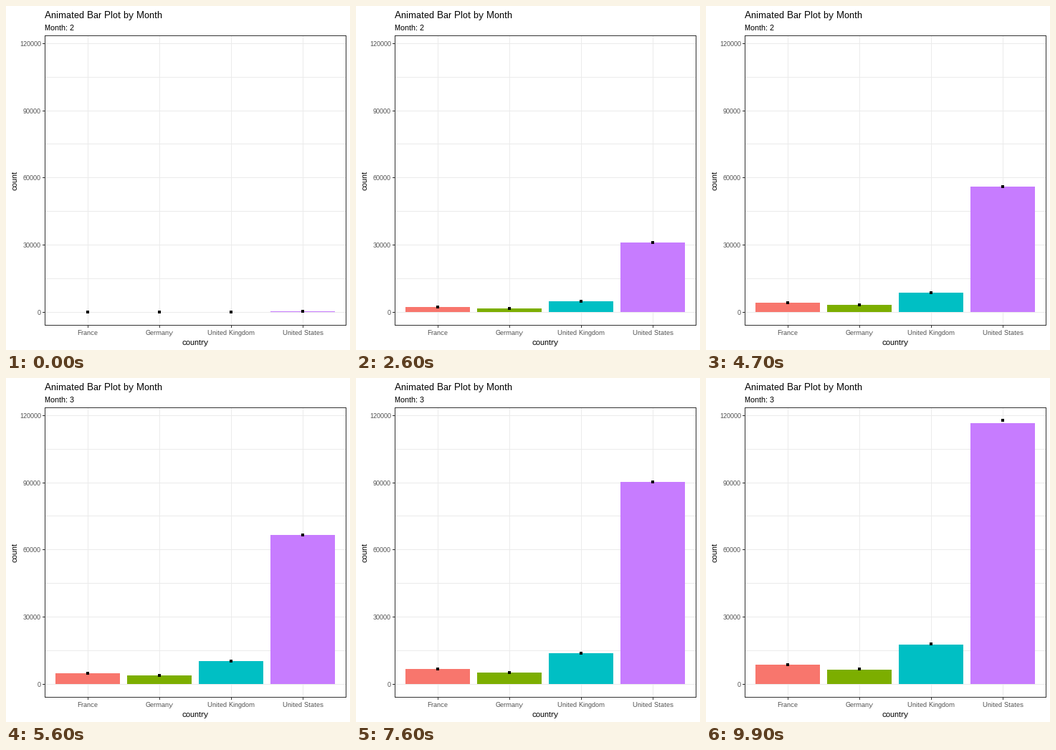
Recreate the animation shown at these times as a matplotlib script. Size 480 by 480 pixels, loop 10 s.

```python
import matplotlib.pyplot as plt
from matplotlib.animation import FuncAnimation
from matplotlib.patches import Circle, Rectangle

SIZE, DPI = 480, 72
FRAMES, INTERVAL = 100, 100
LEFT, RIGHT, TOP, BOTTOM = 54, 474, 41, 445
ZERO, SCALE = 427.14, 0.0031225  # pixel row of count 0, pixels per count
BAR_W = 90

# country: (first count, last count, colour)
DATA = {
    "France": (20, 8680, "#F8766D"),
    "Germany": (30, 6615, "#7CAE00"),
    "United Kingdom": (30, 17980, "#00BFC4"),
    "United States": (253, 117820, "#C77CFF"),
}
CENTERS = [114 + 100 * k for k in range(len(DATA))]
GRID, DARK, GREY = "#EBEBEB", "#333333", "#4D4D4D"

plt.rcParams.update({
    "font.family": "Liberation Sans",
    "text.hinting": "native",
    "text.hinting_factor": 1,
})

fig = plt.figure(figsize=(SIZE / DPI, SIZE / DPI), dpi=DPI, facecolor="white")
ax = fig.add_axes([0, 0, 1, 1])
ax.set_xlim(0, SIZE)
ax.set_ylim(SIZE, 0)
ax.axis("off")


def row(count):
    return ZERO - count * SCALE


def box(x, y, w, h, color, z):
    patch = Rectangle((x, y), w, h, facecolor=color, linewidth=0,
                      antialiased=False, zorder=z)
    return ax.add_patch(patch)


def label(x, y, text, size, color="black", **kw):
    return ax.text(x, y, text, fontsize=size, color=color,
                   va="baseline", zorder=6, **kw)


def draw_panel():
    w, h = RIGHT - LEFT, BOTTOM - TOP
    for count in range(0, 120001, 15000):
        y = int(row(count))
        box(LEFT, y, w, 1, GRID, 1)
        if count % 30000 == 0:
            box(LEFT - 3, y, 3, 1, DARK, 5)
            label(49, y + 4, str(count), 9, GREY, ha="right")
    for x, name in zip(CENTERS, DATA):
        box(x, TOP, 1, h, GRID, 1)
        box(x, BOTTOM + 1, 1, 3, DARK, 5)
        label(x, 459, name, 9, GREY, ha="center")
    for y in (TOP, BOTTOM):
        box(LEFT, y, w + 1, 1, DARK, 5)
    for x in (LEFT, RIGHT):
        box(x, TOP, 1, h + 1, DARK, 5)
    label(54, 17, "Animated Bar Plot by Month", 13)
    label(264, 473, "country", 11, ha="center")
    label(15, 243.5, "count", 11, ha="center", rotation=90,
          rotation_mode="anchor")


draw_panel()
subtitle = label(54, 34, "", 11)
bars, dots = [], []
for x, (_, _, color) in zip(CENTERS, DATA.values()):
    bars.append(box(x - BAR_W / 2, ZERO, BAR_W, 0, color, 2))
    dots.append(ax.add_patch(Circle((x, ZERO), 2, facecolor="black",
                                    linewidth=0, antialiased=False, zorder=4)))


def top_at(first, last, i):
    return round(row(first + (last - first) * i / (FRAMES - 1)))


def update(i):
    # the bars stop one step short of the points
    bar_i = min(i, FRAMES - 2)
    base = int(ZERO)
    for x, (first, last, _), bar, dot in zip(CENTERS, DATA.values(), bars, dots):
        top = top_at(first, last, bar_i)
        bar.set_y(top)
        bar.set_height(base - top)
        dot.center = (x, top_at(first, last, i))
    subtitle.set_text(f"Month: {2 if i < FRAMES // 2 else 3}")
    return [*bars, *dots, subtitle]


anim = FuncAnimation(fig, update, frames=FRAMES, interval=INTERVAL,
                     repeat=True, repeat_delay=0, blit=False)
plt.show()
```
